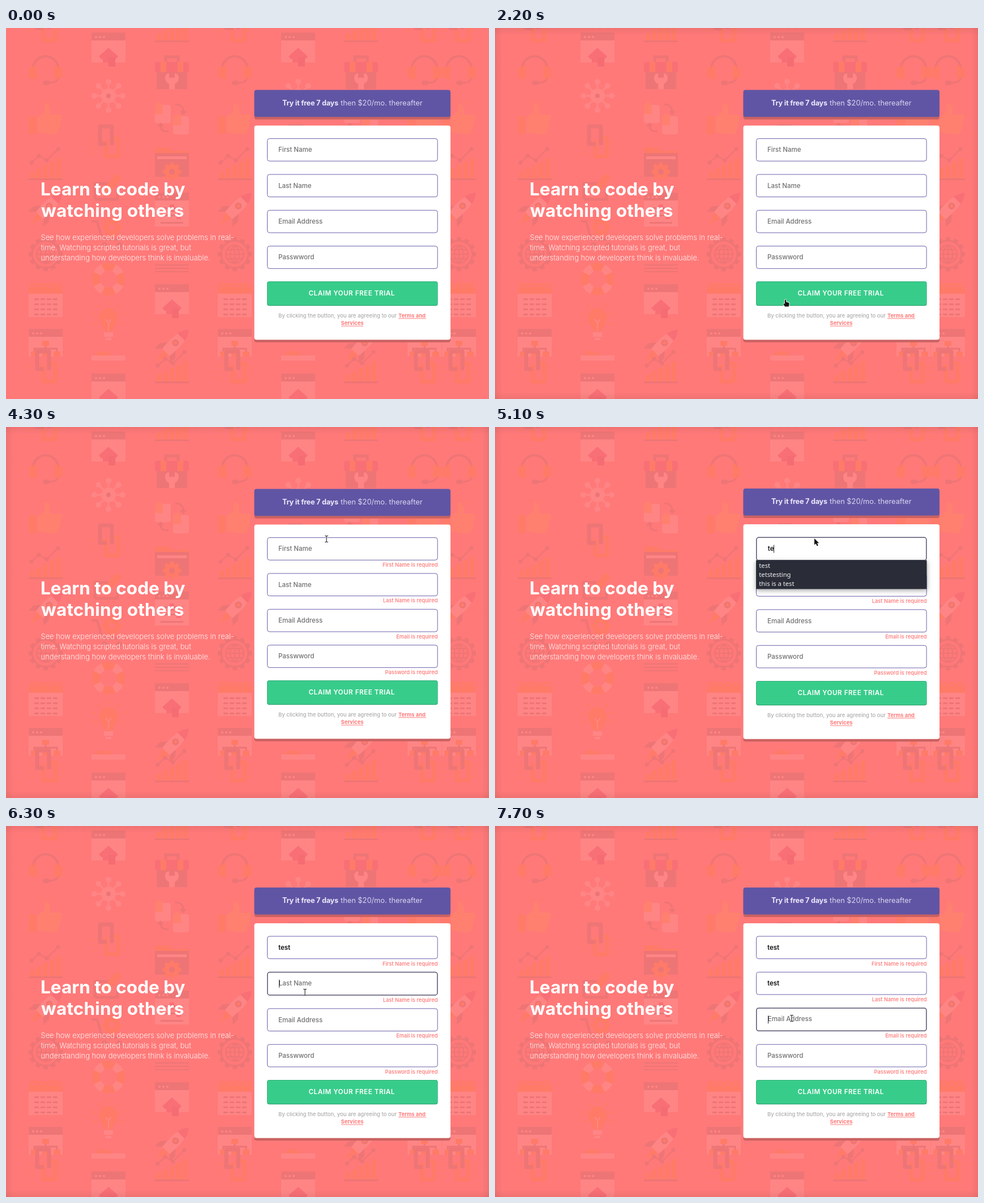
These frames come from a looping animation (853x656 px, 8 s). An HTML page with a canvas:

```html
<!DOCTYPE html>
<html lang="en">
<head>
<meta charset="utf-8">
<title>Sign-up form</title>
<style>
html, body { margin: 0; width: 100%; height: 100%; overflow: hidden; background: #ff7979; }
canvas { display: block; }
</style>
</head>
<body>
<canvas id="stage" width="853" height="656"></canvas>
<script>
const W = 853, H = 656, LOOP = 8000;
const stage = document.getElementById('stage').getContext('2d');
const SANS = 'Poppins, Inter, sans-serif';
const DARK = '#ee7575', LIGHT = '#ff8585', ORANGE = '#ff7b68', RED = '#f96f76', PEACH = '#ff806f';
let g = stage;

// Drawing helpers
function rect(color, x, y, w, h, r = 0) {
  g.fillStyle = color;
  g.beginPath();
  g.roundRect(x, y, w, h, r);
  g.fill();
}
function disc(color, x, y, r) {
  g.fillStyle = color;
  g.beginPath();
  g.arc(x, y, r, 0, 7);
  g.fill();
}
function ring(color, width, x, y, r, from = 0, to = 2 * Math.PI) {
  g.strokeStyle = color;
  g.lineWidth = width;
  g.beginPath();
  g.arc(x, y, r, from, to);
  g.stroke();
}
function fill(color, d) {
  g.fillStyle = color;
  g.fill(new Path2D(d));
}
function line(color, width, d) {
  g.strokeStyle = color;
  g.lineWidth = width;
  g.stroke(new Path2D(d));
}
function text(str, x, y, font, color, spacing = 0, align = 'left') {
  g.font = font;
  g.letterSpacing = spacing + 'px';
  g.textAlign = align;
  g.fillStyle = color;
  g.fillText(str, x, y);
}
function spokes(n, draw) {
  for (let i = 0; i < n; i++) {
    g.save();
    g.rotate(i * 2 * Math.PI / n);
    draw(i);
    g.restore();
  }
}
function at(x, y, draw) {
  g.save();
  g.translate(x, y);
  draw();
  g.restore();
}
function browser(bottom) {
  rect(LIGHT, -30, -16, 60, bottom + 16);
  rect(DARK, -30, -30, 60, 14);
  for (const x of [-22, -15, -8]) disc(LIGHT, x, -22, 2);
}
function gear(color, r) {
  spokes(8, () => rect(color, -r * .22, -r * 1.25, r * .44, r * .6));
  ring(color, r * .6, 0, 0, r * .7);
}

// Background icons, each about 60 px wide around its centre
const icons = {
  house() {
    browser(23);
    fill(RED, 'M0-3L17 12L13 17H10V23H-10V17H-13L-17 12Z');
    rect('#f56c73', 0, 13, 12, 17);
  },
  sitemap() {
    browser(19);
    line(DARK, 3, 'M0-2V11M-20 12V5H20V12');
    rect(ORANGE, -6, -9, 12, 9);
    for (const x of [-26, -6, 14]) rect(ORANGE, x, 10, 12, 9);
  },
  slider() {
    browser(30);
    for (const y of [-4, 9, 22]) rect(DARK, -20, y, 40, 3);
    rect(RED, -4, -9, 8, 13);
    rect(RED, 8, 4, 8, 13);
  },
  headset() {
    ring(DARK, 4, 0, -3, 22, Math.PI, 2 * Math.PI);
    line(DARK, 3, 'M23 8Q23 22 6 22');
    rect(DARK, -5, 18, 12, 8, 4);
    rect(ORANGE, -30, -6, 8, 20, 4);
    rect(ORANGE, 22, -6, 8, 20, 4);
    rect(ORANGE, -22, -9, 7, 25, 3);
    rect(ORANGE, 15, -9, 7, 25, 3);
  },
  thumb() {
    rect(ORANGE, -30, -2, 14, 32);
    fill(PEACH, 'M-14 0L-2-10V-24Q6-26 8-16V-5H26Q31-3 28 4L26 10L25 17L21 27Q18 31 8 30L-14 26Z');
    line(ORANGE, 2, 'M-8-30L-5-23M4-32V-26M16-29L12-22');
  },
  chart() {
    for (let i = 0; i < 5; i++) rect(ORANGE, -27 + i * 11.5, 14 - i * 6, 8, 13 + i * 6);
    rect(DARK, -30, 26, 60, 3);
    line(DARK, 2, 'M-25-2L-12-14L2-6L22-26');
    for (const [x, y] of [[-25, -2], [-12, -14], [2, -6], [22, -26]]) disc(DARK, x, y, 3.5);
  },
  rocket() {
    g.rotate(Math.PI / 4);
    fill(ORANGE, 'M-7 13H7L0 38Z');
    fill(DARK, 'M-8-2L-19 11V24L-8 14ZM8-2L19 11V24L8 14Z');
    fill(LIGHT, 'M0-42C10-30 12-10 9 15H-9C-12-10-10-30 0-42Z');
    fill(RED, 'M0-42C5-36 8-30 9-23H-9C-8-30-5-36 0-42Z');
    disc(DARK, 0, -9, 6);
    disc(ORANGE, 0, -9, 3);
  },
  globe() {
    spokes(12, () => rect(DARK, -4, -30, 8, 6));
    ring(DARK, 3, 0, 0, 24);
    line(DARK, 2, 'M-16 0H16M0-16V16M-13-8H13M-13 8H13M0-16C-11-7-11 7 0 16C11 7 11-7 0-16');
    ring(DARK, 2, 0, 0, 16);
  },
  calendar() {
    rect(LIGHT, -30, -13, 60, 42);
    rect(ORANGE, -30, -24, 60, 12);
    for (let x = -21; x < 25; x += 14) ring(ORANGE, 4, x, -24, 6, 2, 6.8);
    for (let y = -4; y < 24; y += 9)
      for (let x = -20; x < 18; x += 11) rect(DARK, x, y, 8, 3);
  },
  virus() {
    spokes(8, () => {
      rect(LIGHT, -1.5, -24, 3, 16);
      disc(LIGHT, 0, -25, 5);
    });
    disc(LIGHT, 0, 0, 13);
    disc(DARK, 0, 0, 4);
  },
  chain() {
    g.lineJoin = 'round';
    line(ORANGE, 7, 'M-4-4V26H17V-6H9');
    line(DARK, 7, 'M-3 4H-15V-27H6V6');
    line(ORANGE, 2, 'M-29-2L-22 1M-30 10H-23M-28 22L-22 18M30-2L24 1M31 10H25M29 22L24 18');
  },
  pencil() {
    line(DARK, 5, 'M-24 22H16V4M-24 22V-6H2');
    fill(ORANGE, 'M-10 4L14-24L24-16L0 13L-13 17Z');
    fill(LIGHT, 'M-10 4L0 13L-13 17Z');
  },
  cart() {
    at(6, -10, () => gear(ORANGE, 14));
    line(DARK, 4, 'M-30-20H-20L-11 12H22');
    disc(DARK, -7, 22, 5);
    disc(DARK, 19, 22, 5);
  },
  buoy() {
    ring(ORANGE, 14, 0, 0, 22);
    for (let i = 0; i < 4; i++) ring(LIGHT, 14, 0, 0, 22, i * 1.571 + .45, i * 1.571 + 1.12);
  },
  bulb() {
    for (let i = 0; i < 7; i++) at(0, -10, () => {
      g.rotate((i - 3) * .65);
      rect(ORANGE, -1.5, -30, 3, 8);
    });
    fill(ORANGE, 'M-17-11A17 17 0 0 1 17-11C17 0 8 4 8 13H-8C-8 4-17 0-17-11Z');
    line(LIGHT, 2, 'M-5-8L0-2L5-8M0-2V12');
    rect(LIGHT, -8, 15, 16, 8);
    rect(LIGHT, -5, 25, 10, 4);
  },
  strip() {
    rect(LIGHT, -30, 0, 60, 9);
    fill(ORANGE, 'M-24 0Q-18-10-10-8L-4-4L4-9V0Z');
  },
  toolbox() {
    line(DARK, 5, 'M-11-16V-26H11V-16');
    rect(RED, -30, -17, 60, 18, 4);
    rect(ORANGE, -20, -17, 10, 18);
    rect(ORANGE, 10, -17, 10, 18);
    rect(DARK, -27, 1, 54, 30);
    fill(LIGHT, 'M-5 31V22Q-13 18-12 9Q-10 3-5 3V11H5V3Q10 3 12 9Q13 18 5 22V31Z');
  },
  papers() {
    rect(LIGHT, -30, -22, 28, 32, 4);
    rect(LIGHT, 2, -2, 28, 32, 4);
    fill(PEACH, 'M-30-20Q-23-34-16-20V-6H-30ZM2 0Q9-13 16 0V14H2Z');
    line(DARK, 3, 'M6-23Q20-23 20-10M-6 25Q-20 25-20 15');
    fill(DARK, 'M14-11H26L20-4ZM-26 16H-14L-20 9Z');
  },
  folder() {
    fill(ORANGE, 'M-30-28H-6L0-22H30V-10H-30Z');
    rect(DARK, -30, -18, 60, 42);
    rect(LIGHT, -26, -12, 52, 5);
    at(0, 15, () => gear(ORANGE, 13));
  },
  lines() {
    for (let y = 13; y < 26; y += 6) rect(DARK, -30, y, 60, 2);
  }
};

// Icon names with their centre heights, per column type
const stacks = {
  a: { sitemap: [562], chain: [-4, 599], headset: [75], thumb: [158], chart: [240], rocket: [321], globe: [400], calendar: [482] },
  b: { house: [38, 641], virus: [120], chain: [201], pencil: [281], cart: [362], buoy: [444], bulb: [523], strip: [579] },
  c: { rocket: [563], chart: [-4, 599], toolbox: [77], papers: [158], folder: [239], slider: [321], lines: [405], house: [483] }
};
const columns = [[70, 'a'], [181, 'b'], [293, 'c'], [404, 'a'], [516, 'b'], [627, 'c'], [739, 'a'], [800, 'a']];

const backdrop = document.createElement('canvas');
backdrop.width = W;
backdrop.height = H;
g = backdrop.getContext('2d');
rect('#ff7979', 0, 0, W, H);
for (const [x, kind] of columns)
  for (const [name, heights] of Object.entries(stacks[kind]))
    for (const y of heights) at(x, y, icons[name]);
g = stage;

function edgeShade() {
  const depth = 13;
  for (const [x0, y0, x1, y1] of [[0, 0, depth, 0], [W, 0, W - depth, 0], [0, 0, 0, depth], [0, H, 0, H - depth]]) {
    const shade = g.createLinearGradient(x0, y0, x1, y1);
    shade.addColorStop(0, 'rgba(0,0,0,.06)');
    shade.addColorStop(1, 'rgba(0,0,0,0)');
    g.fillStyle = shade;
    g.fillRect(0, 0, W, H);
  }
}

function copy() {
  const title = `700 31.5px ${SANS}`, body = `300 12.9px ${SANS}`;
  text('Learn to code by', 61, 296, title, '#fff');
  text('watching others', 62, 334, title, '#fff', .2);
  ['See how experienced developers solve problems in real-',
    'time. Watching scripted tutorials is great, but',
    'understanding how developers think is invaluable.'
  ].forEach((row, i) => text(row, 61.5, 375 + i * 18.2, body, 'rgba(255,255,255,.88)'));
}

function card(y, h, color) {
  rect('#ca6262', 438.5, y + 4.5, 346.5, h, 4);
  rect(color, 438.5, y, 346.5, h, 4);
}

const fields = [
  ['First Name', 'First Name is required'],
  ['Last Name', 'Last Name is required'],
  ['Email Address', 'Email is required'],
  ['Passwword', 'Password is required']
];
const keyTimes = [[4900, 5000, 5200, 5300], [6500, 6600, 6700, 6800], [], []];
const typed = (i, t) => 'test'.slice(0, keyTimes[i].filter(k => k <= t).length);

function field(i, y, t, focus, errors) {
  const on = i === focus, x = on ? 481.7 : 481, value = typed(i, t);
  const weight = on ? 1.5 : 1, inset = weight / 2;
  g.strokeStyle = on ? '#55536f' : '#6b62ab';
  g.lineWidth = weight;
  g.beginPath();
  g.roundRect(461 + inset, y + inset, 301.6 - weight, (on ? 41.9 : 40.7) - weight, 4);
  g.stroke();
  text(value || fields[i][0], x, y + 24.2, `${value ? 600 : 500} 11.5px ${SANS}`, value ? '#111' : '#707070');
  if (on) {
    const atStart = i === 0 && t >= 5500;
    const end = value && !atStart ? g.measureText(value).width : 0;
    rect('#222', Math.round(x + end), y + 14, 1, 14);
  }
  if (errors) text(fields[i][1], 762.5, y + (on ? 53 : 52), `500 9.3px ${SANS}`, '#ff7474', 0, 'right');
}

function dropdown(y, items, hover) {
  g.save();
  g.shadowColor = 'rgba(0,0,0,.35)';
  g.shadowBlur = 8;
  g.shadowOffsetY = 2;
  rect('#2a2c37', 461, y, 301.5, items.length * 16 + 3);
  g.restore();
  if (hover) rect('#252731', 463, y + 1, 298, 17);
  items.forEach((item, i) => text(item, 466.3, y + 13.5 + i * 16, '400 11.2px "Noto Sans", sans-serif', '#f4f4f6'));
}

function form(t) {
  const focus = t < 4600 ? -1 : t < 6300 ? 0 : t < 7700 ? 1 : 2;
  const grow = focus < 0 ? 0 : .6;
  const low = focus < 0 ? 0 : 1;
  card(109.4 - grow, 47.8, '#6055a4');
  text('Try it free 7 days', 488, 137 - low, `700 12.6px ${SANS}`, '#ece9fb', -.2);
  text('then $20/mo. thereafter', 591, 137 - low, `400 12.8px ${SANS}`, '#d9d5f0');
  card(172.6 - grow, 378.6 + grow * 2, '#fff');

  fields.forEach((_, i) => field(i, 195.1 + i * 63.35 + (i > focus ? grow : -grow), t, focus, t >= 3600));

  const pressed = t >= 3400 && t < 3600;
  const by = 448 + low;
  rect('#2fa671', 461, by, 301.6, 43.3, 4);
  rect(pressed ? '#35c184' : '#38cc8b', 461.7, by + .7, 300.2, 41.2, 3.5);
  text('CLAIM YOUR FREE TRIAL', 534.5, by + 25, `600 11.6px ${SANS}`, '#fff', .55);

  const ty = 511.8 + low, link = `700 9.3px ${SANS}`;
  text('By clicking the button, you are agreeing to our', 481, ty, `500 9.5px ${SANS}`, '#acacac');
  text('Terms and', 693, ty, link, '#ff7979');
  rect('#ff7979', 693, ty + 1.4, 49, 1);
  text('Services', 611.5, ty + 13.4, link, '#ff7979', 0, 'center');
  rect('#ff7979', 592, ty + 14.8, 39, 1);

  if (t >= 4900 && t < 5500) dropdown(235.5, ['test', 'tetstesting', 'this is a test'], false);
  if (t >= 6500 && t < 7500) dropdown(299, ['test'], t >= 7000);
}

// Pointer: time, x, y
const track = [
  [1600, 433, 562], [1900, 482, 513], [2200, 513, 480], [2400, 513, 480], [2500, 516, 479],
  [2800, 516, 479], [3000, 524, 475.5], [3100, 524, 475.5], [3200, 526, 474.5], [3900, 526, 474.5],
  [4100, 552, 310], [4300, 566, 198], [5000, 566, 198], [5100, 564, 197], [5300, 564, 197],
  [5400, 562, 242], [5500, 562, 244], [5700, 561, 205], [5900, 561, 205], [6200, 528, 294],
  [6900, 528, 294], [7000, 526, 301], [7200, 524, 304], [7400, 524, 306], [7600, 524, 340], [8000, 524, 340]
];
function pointerAt(t) {
  const i = track.findIndex(k => k[0] > t);
  const [t0, x0, y0] = track[i - 1], [t1, x1, y1] = track[i];
  const u = (t - t0) / (t1 - t0);
  return [x0 + (x1 - x0) * u, y0 + (y1 - y0) * u];
}
function outlined(d) {
  g.lineJoin = 'round';
  line('#fff', 1.8, d);
  fill('#111', d);
}
const shapes = {
  arrow: () => outlined('M0 0V11.5L2.7 9L4.7 13.4L6.7 12.5L4.8 8.3H8.2Z'),
  hand: () => outlined('M-1.2 1.2Q0-.6 1.2 1.2V4.6L5.4 5.4Q6.8 6 6.6 8L5.8 12.4H-1L-3.8 8.4Q-3.6 6.8-2.2 7.2L-1.2 8Z'),
  beam() {
    const d = 'M-3-5.5H-1L0-4.5L1-5.5H3M-3 5.5H-1L0 4.5L1 5.5H3M0-4.5V4.5';
    line('rgba(255,255,255,.8)', 2.6, d);
    line('#333', 1.2, d);
  }
};
function pointer(t) {
  if (t < 1600) return;
  const [x, y] = pointerAt(t);
  const listOpen = (t >= 4900 && t < 5500) || (t >= 6500 && t < 7500);
  const inside = x > 461 && x < 763;
  const overField = inside && y >= 195 && y < 426 && (y - 195) % 63.4 < 41;
  const overTerms = x > 481 && x < 742 && y > 502 && y < 516;
  const kind = listOpen ? 'arrow' : inside && y > 448 && y < 491 ? 'hand' : overField || overTerms ? 'beam' : 'arrow';
  at(x, y, shapes[kind]);
}

function draw(now) {
  const t = Math.floor(now % LOOP / 100) * 100;
  g.drawImage(backdrop, 0, 0);
  if (t >= 200) edgeShade();
  copy();
  form(t);
  pointer(t);
}

const start = performance.now();
function tick() {
  draw(performance.now() - start);
  requestAnimationFrame(tick);
}
tick();
</script>
</body>
</html>
```
